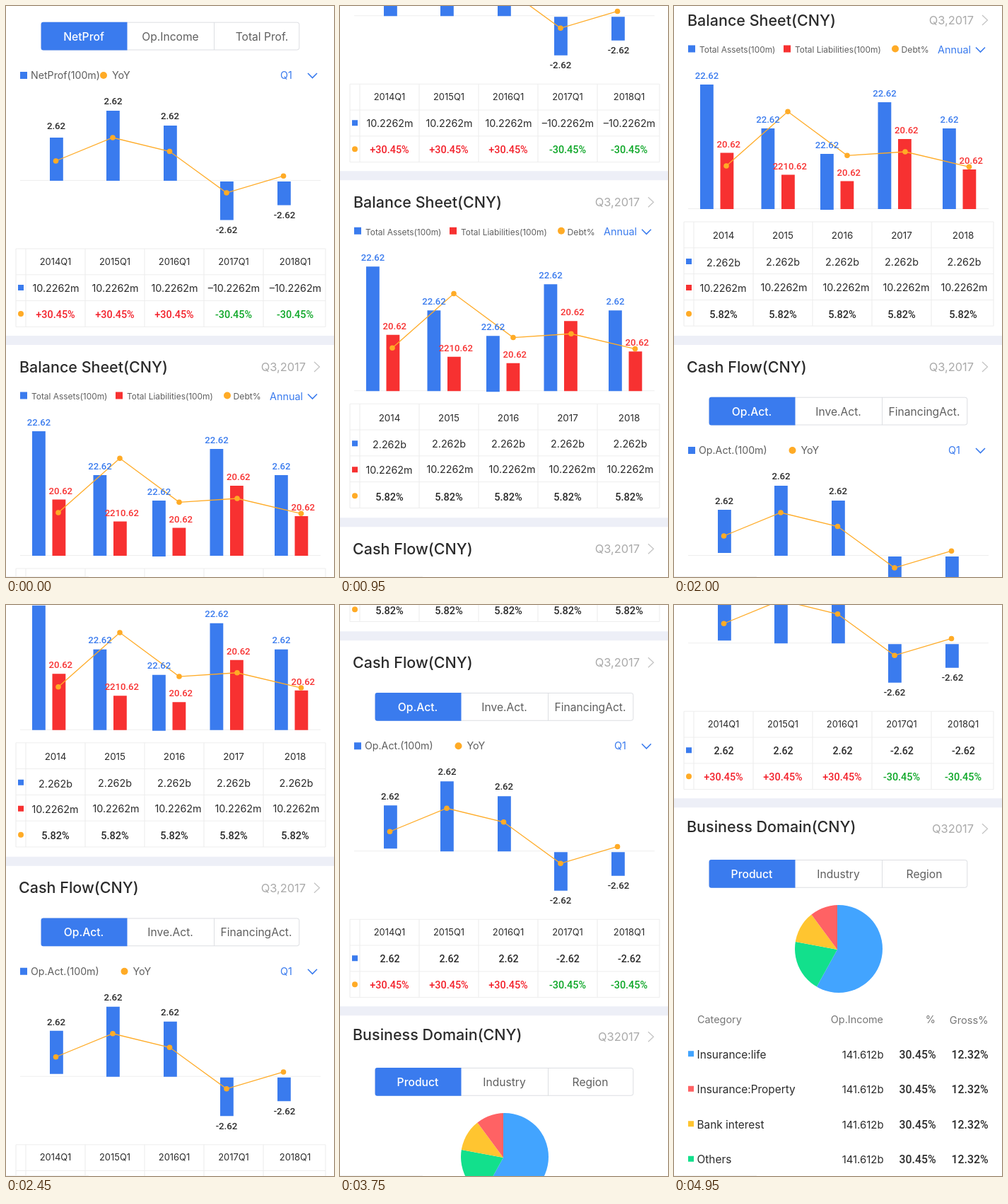
These frames come from a looping animation (464 px wide and 807 px high, 5000 ms). An HTML page with a canvas:

```html
<!DOCTYPE html>
<html lang="en">
<head>
<meta charset="utf-8">
<title>Financial report scroll</title>
<style>
html, body { margin: 0; width: 100%; height: 100%; overflow: hidden; background: #fff; }
canvas { display: block; width: 464px; height: 807px; }
</style>
</head>
<body>
<canvas id="stage" width="464" height="807"></canvas>
<script>
const ctx = document.getElementById('stage').getContext('2d');
const BLUE = '#3a7bee', RED = '#f73131', ORANGE = '#ffab26', INK = '#2b2b2b';
const GRAY = '#5f5f5f', PALE = '#aaaaaa', LINE = '#eeeeee', BAND = '#edeff7';
const UP = '#f3222c', DOWN = '#0ea728';
const LABEL = 'Inter, sans-serif', FIGURE = 'Roboto, sans-serif';
const COLUMNS = [70, 154, 238, 322, 409];
const LOOP = 5000, STEP = 50, SPEED = 12.25;

// y is the middle of the capitals
function text(str, x, y, size, color = INK, align = 'center', family = LABEL, weight = 400) {
  ctx.font = `${weight} ${size}px ${family}`;
  ctx.fillStyle = color;
  ctx.textAlign = align;
  ctx.fillText(str, x, y + size * 0.36);
}

const figure = (str, x, y, size, color = INK, align = 'center') =>
  text(str, x, y, size, color, align, FIGURE, 500);

function rect(x0, y0, x1, y1, color) {
  ctx.fillStyle = color;
  ctx.fillRect(x0, y0, x1 - x0, y1 - y0);
}

const square = (x, y, size, color) => rect(x - size / 2, y - size / 2, x + size / 2, y + size / 2, color);

function dot(x, y, r) {
  ctx.fillStyle = ORANGE;
  ctx.beginPath();
  ctx.arc(x, y, r, 0, 7);
  ctx.fill();
}

function polyline(points, color, width) {
  ctx.strokeStyle = color;
  ctx.lineWidth = width;
  ctx.beginPath();
  points.forEach(([x, y]) => ctx.lineTo(x, y));
  ctx.stroke();
}

function trend(points) {
  polyline(points, ORANGE, 1.3);
  points.forEach(([x, y]) => dot(x, y, 3.8));
}

function shifted(dy, draw) {
  ctx.save();
  ctx.translate(0, dy);
  draw();
  ctx.restore();
}

function heading(title, x, y, period, periodY = y) {
  text(title, x - 1, y, 21.5, INK, 'left', LABEL, 500);
  text(period, 424, periodY, 16.4, PALE, 'right');
  polyline([[436, periodY - 7], [443.5, periodY], [436, periodY + 7]], '#c4c4c4', 1.3);
}

function dropdown(label, x, y) {
  text(label, x, y, 14.4, BLUE, 'left');
  polyline([[427, y - 3], [433.5, y + 3.5], [440, y - 3]], BLUE, 1.6);
}

function tabs(labels, lastX = 354) {
  ctx.strokeStyle = '#dcdee2';
  ctx.lineWidth = 1;
  ctx.beginPath();
  ctx.roundRect(50, 23.2, 364.8, 38.8, 3);
  ctx.stroke();
  rect(294, 23, 295, 62, '#dcdee2');
  ctx.fillStyle = BLUE;
  ctx.beginPath();
  ctx.roundRect(49.6, 22.8, 121.9, 39.6, [3, 0, 0, 3]);
  ctx.fill();
  text(labels[0], 110, 43, 15.7, '#fff', 'center', LABEL, 500);
  text(labels[1], 232.5, 43, 15.6, GRAY);
  text(labels[2], lastX, 43, 15.6, GRAY);
}

function grid(top, rows) {
  const pitch = 36.8, bottom = top + rows * pitch;
  for (let i = 0; i <= rows; i++) {
    const y = top + i * pitch;
    rect(14, y - 0.5, 452, y + 0.5, LINE);
  }
  [14, 28, 112, 196, 280, 364, 452].forEach(x => rect(x - 0.5, top, x + 0.5, bottom, '#ebebeb'));
}

// Tabs, legend, signed bars, trend and table of one quarterly section
function quarterly({ names, lastX, legend, markX, firstLift, row }) {
  tabs(names, lastX);
  square(25, 98, 10, BLUE);
  text(legend, 35, 98, 14.2, GRAY, 'left');
  dot(markX, 98, 5);
  text('YoY', markX + 12, 98, 14.3, GRAY, 'left');
  dropdown('Q1', 388, 98);

  rect(20, 246, 445, 247, LINE);
  [[62, 186 - firstLift, 247 - firstLift], [142, 148, 247], [223, 169, 247], [303, 248, 302.5], [384, 248, 281.5]]
    .forEach(([x, top, bottom]) => rect(x, top, x + 18.8, bottom, BLUE));
  trend([[70.5, 219], [151, 186], [231.5, 205.5], [312, 264], [392.5, 240.2]]);
  [[71, 169], [151.5, 134], [232, 155], [312, 316], [394, 295]]
    .forEach(([x, y], i) => figure(i < 3 ? '2.62' : '-2.62', x, y, 13.2));

  grid(343, 3);
  square(21, 398, 8, BLUE);
  dot(21, 435, 4);
  COLUMNS.forEach((x, i) => {
    const rising = i < 3;
    text(2014 + i + 'Q1', x, 361, 12.9);
    row(x, rising);
    figure((rising ? '+' : '-') + '30.45%', x, 436, 14.4, rising ? UP : DOWN);
  });
  rect(0, 466, 464, 479, BAND);
}

function balanceSheet() {
  heading('Balance Sheet(CNY)', 20, 510, 'Q3,2017');
  square(25, 550.5, 10, BLUE);
  text('Total Assets(100m)', 36, 552, 11.9, GRAY, 'left');
  square(160, 550.5, 10, RED);
  text('Total Liabilities(100m)', 171, 552, 11.9, GRAY, 'left');
  dot(313, 550.5, 5);
  text('Debt%', 321.5, 552, 12.2, GRAY, 'left');
  dropdown('Annual', 373, 551.5);

  rect(20, 776, 445, 777, LINE);
  // left edge, asset top, liability top
  const pairs = [[37, 601, 697.5], [123.5, 663, 728.5], [207, 699, 737.5], [288.5, 626, 678], [380, 663, 721]];
  pairs.forEach(([x, asset, debt], i) => {
    rect(x, asset, x + 18.8, i === 2 ? 778 : 777, BLUE);
    rect(x + 28.5, debt, x + 47.3, 777, RED);
  });
  trend([[74, 716], [161, 639.3], [245, 701.3], [327, 696], [417.5, 717.3]]);
  pairs.forEach(([x, asset, debt], i) => {
    figure(i === 4 ? '2.62' : '22.62', x + 9.5, asset - 13, 13.1, BLUE);
    figure(i === 1 ? '2210.62' : '20.62', x + 40.3, debt - 12.7, 13.1, RED);
  });

  grid(795, 4);
  square(21, 851, 8, BLUE);
  square(21, 888, 8, RED);
  dot(21, 925, 4);
  const debtX = [69.5, 155.5, 243.5, 328.5, 410.5];
  COLUMNS.forEach((x, i) => {
    const drop = i ? 0 : 1;
    text(2014 + i, x, 814.5, 13.4);
    text('2.262b', i === 4 ? 410.5 : x, 852 + drop, 14.3);
    text('10.2262m', debtX[i], 888 + drop, 14.3);
    figure('5.82%', x, 926, 14.6);
  });
  rect(0, 956, 464, 969, BAND);
}

function pie(x, y) {
  const slices = [['#42a4ff', -90, 119], ['#12e08c', 119, 190.6], ['#ffc530', 190.6, 233.5], ['#ff6264', 233.5, 270]];
  ctx.save();
  ctx.beginPath();
  ctx.arc(x, y, 62, 0, 7);
  ctx.clip();
  slices.forEach(([color, from, to]) => {
    ctx.fillStyle = color;
    ctx.beginPath();
    ctx.moveTo(x - 2, y + 1);
    ctx.arc(x - 2, y + 1, 80, from * Math.PI / 180, to * Math.PI / 180);
    ctx.fill();
  });
  ctx.restore();
}

function businessDomain() {
  heading('Business Domain(CNY)', 19, 1526.5, 'Q32017', 1529);
  shifted(1550, () => tabs(['Product', 'Industry', 'Region']));
  pie(233, 1698.7);
  const head = 1799;
  text('Category', 33, head, 14.4, '#777', 'left');
  text('Op.Income', 296, head, 14.4, '#777', 'right');
  text('%', 370, head, 14.4, '#777', 'right');
  text('Gross%', 444.5, head, 14.6, '#777', 'right');
  [['Insurance:life', '#42a4ff'], ['Insurance:Property', '#ff6264'], ['Bank interest', '#ffc530'], ['Others', '#12e08c']]
    .forEach(([name, color], i) => {
      const y = 1848 + i * 49.5;
      square(24, y - 1, 8, color);
      text(name, 32.5, y, 15.4, INK, 'left');
      text('141.612b', 296.5, y, 14.9, INK, 'right');
      figure('30.45%', 370.5, y, 15.8, INK, 'right');
      figure('12.32%', 444.5, y, 15.8, INK, 'right');
    });
}

function page() {
  quarterly({
    names: ['NetProf', 'Op.Income', 'Total Prof.'], lastX: 362,
    legend: 'NetProf(100m)', markX: 138, firstLift: 0,
    row: (x, rising) => text((rising ? '' : '–') + '10.2262m', x + 0.5, 399, 14.3)
  });
  balanceSheet();
  heading('Cash Flow(CNY)', 19, 1000, 'Q3,2017');
  shifted(1020, () => quarterly({
    names: ['Op.Act.', 'Inve.Act.', 'FinancingAct.'],
    legend: 'Op.Act.(100m)', markX: 167.5, firstLift: 4,
    row: (x, rising) => figure(rising ? '2.62' : '-2.62', x + 0.5, 399, 14.2)
  }));
  businessDomain();
}

function frame(now) {
  const step = Math.floor((now % LOOP) / STEP);
  rect(0, 0, 464, 807, '#fff');
  shifted(-step * SPEED, page);
  rect(0, 806, 117, 807, '#f2f2f2');
  requestAnimationFrame(frame);
}
requestAnimationFrame(frame);
</script>
</body>
</html>
```
